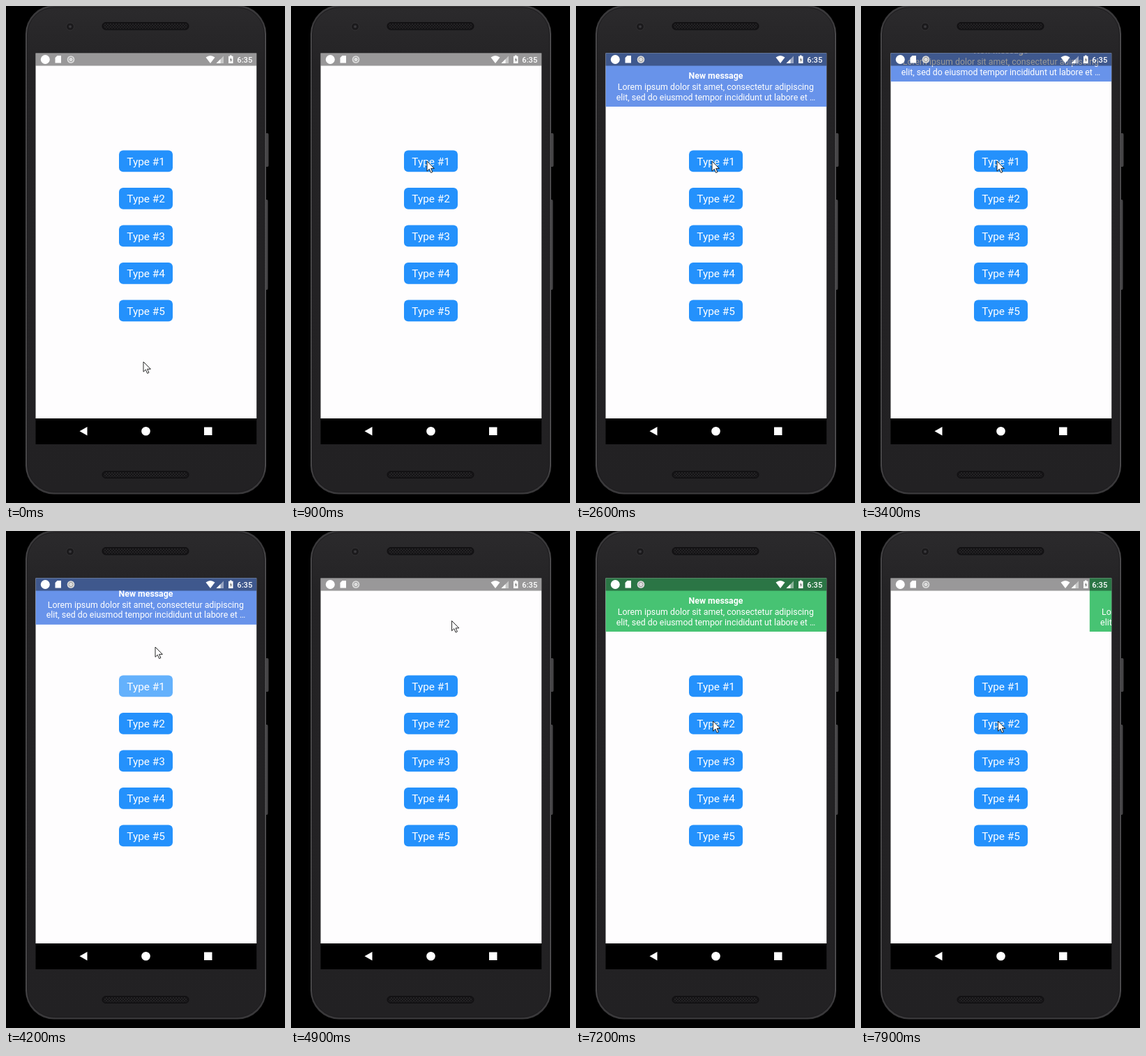
Write an HTML page that moves like this. It is 400 px wide and 711 px high and loops after 8000 ms.

```html
<!DOCTYPE html>
<html lang="en">
<head>
<meta charset="utf-8">
<title>Message banner demo</title>
<style>
  html, body { margin: 0; width: 100%; height: 100%; overflow: hidden; background: #000; }
  svg { display: block; width: 100%; height: 100%; }
  text { font-family: Roboto, sans-serif; fill: #fff; }
  .mid { text-anchor: middle; }
</style>
</head>
<body>
<svg viewBox="0 0 400 711">
  <defs>
    <clipPath id="screen"><rect x="42.5" y="67.5" width="316.7" height="522.5"/></clipPath>
    <linearGradient id="rim">
      <stop offset="0" stop-color="#4c4b4d"/><stop offset=".012" stop-color="#39383a"/>
      <stop offset=".988" stop-color="#39383a"/><stop offset="1" stop-color="#504f51"/>
    </linearGradient>
    <linearGradient id="front" x2="0" y2="1">
      <stop offset="0" stop-color="#2b2a2c"/><stop offset=".12" stop-color="#242325"/>
      <stop offset="1" stop-color="#222123"/>
    </linearGradient>
    <pattern id="mesh" width="4" height="4" patternUnits="userSpaceOnUse">
      <path d="M0 4L4 0M0 0L4 4" stroke="#2b2a2c" stroke-width=".7"/>
    </pattern>
  </defs>

  <!-- phone -->
  <path d="M373 182h2q1.500 0 1.500 2v44q0 2-1.500 2h-2zM373 277h1q1.500 0 1.500 2v125q0 2-1.500 2h-1z" fill="#454446"/>
  <rect x="28" y="-1" width="345" height="699.500" rx="41" fill="url(#rim)"/>
  <rect x="30.500" y="2" width="340" height="693.500" rx="39" fill="url(#front)" stroke="#171618" stroke-width=".8"/>
  <circle cx="92" cy="29.500" r="5.500" fill="#1b1a1c" stroke="#343335"/>
  <circle cx="92" cy="29.500" r="2" fill="#39383c"/>
  <g fill="#141315" stroke="#111012">
    <rect x="138" y="23.500" width="124" height="10.500" rx="5"/>
    <rect x="138" y="665.500" width="124" height="10" rx="5"/>
  </g>
  <g fill="url(#mesh)">
    <rect x="140" y="25" width="120" height="7.500" rx="3.700"/>
    <rect x="140" y="667" width="120" height="7" rx="3.500"/>
  </g>

  <!-- screen -->
  <g clip-path="url(#screen)">
    <rect x="42" y="67" width="318" height="523" fill="#fefdfe"/>
    <g id="buttons" font-size="15.400"></g>
    <g id="banner">
      <rect id="fill" x="42.500" y="67" width="317" height="77"/>
      <g class="mid" font-size="12.350">
        <text x="200.500" y="103.700" font-weight="700">New message</text>
        <text x="200.300" y="120.200">Lorem ipsum dolor sit amet, consectetur adipiscing</text>
        <text x="200.500" y="134.600">elit, sed do eiusmod tempor incididunt ut labore et …</text>
      </g>
    </g>
    <rect x="42" y="67" width="318" height="18.500" opacity=".4"/>
    <g fill="#fff">
      <circle cx="56.300" cy="76.500" r="6.500"/>
      <path d="M73.500 71h5.500v10.500h-8.500v-7.500z"/>
      <circle cx="93" cy="76.500" r="5.300" fill="#ddd"/>
      <circle cx="93" cy="76.500" r="3.200" fill="none" stroke="#999" stroke-width="1"/>
      <path d="M286.500 73.500Q293 68.500 299.500 73.500L293 82z"/>
      <path d="M312 71.500V82H301.500z" opacity=".45"/>
      <path d="M307.500 76V82H301.500z"/>
      <path d="M321 70.500h2.500v1.300h2v10.200h-6.500v-10.200h2z"/>
      <path d="M322.800 73.500l-2 4h1.400v3l2-4h-1.400z" fill="#777"/>
    </g>
    <text x="331.300" y="80.900" font-size="11.200" font-weight="500">6:35</text>
  </g>
  <rect x="42.500" y="590" width="316.700" height="37"/>
  <g fill="#fff">
    <path d="M116.500 602v12.500L105.500 608.200z"/>
    <circle cx="200.500" cy="608.300" r="6.300"/>
    <rect x="284" y="602.500" width="11.500" height="11.500"/>
  </g>

  <path id="cursor" d="M0 0V14.300L3.300 11.200L5.600 16.500L7.900 15.500L5.600 10.400H10.300Z"
        fill="#fff" stroke="#111" stroke-width=".9" stroke-linejoin="round"/>
</svg>
<script>
  const LOOP = 8000, TICK = 100;
  const $ = id => document.getElementById(id);
  const clamp = u => Math.min(1, Math.max(0, u));
  const span = (t, start, length) => clamp((t - start) / length);

  $('buttons').innerHTML = [0, 1, 2, 3, 4].map(i => `<g>
    <rect x="162" y="${206.4 + 53.5 * i}" width="77" height="30.800" rx="6" fill="#2491fc"/>
    <text class="mid" x="200.600" y="${227.6 + 53.5 * i}">Type #${i + 1}</text></g>`).join('');
  const buttons = [...$('buttons').children];

  // Each tap shows a banner that slides in from the top or from the right.
  const shows = [
    { button: 0, start: 1287, hide: 3302, color: '#6893ea', dx: 0, dy: -77 },
    { button: 0, start: 4028, hide: 4605, color: '#6893ea', dx: 0, dy: -77 },
    { button: 1, start: 5624, hide: 7711, color: '#47c373', dx: 317, dy: 0 }
  ];

  // Pointer moves: start, end, then a quadratic curve.
  const moves = [
    [100, 900, [197, 509], [245, 370], [195, 222]],
    [4000, 4400, [195, 222], [215.5, 163], [230, 116]],
    [4770, 5500, [230, 116], [235, 190], [197, 275]],
    [6300, 6600, [197, 275], [197, 273], [196.5, 272]]
  ];

  function pointer(t) {
    const [start, end, a, b, c] = moves.findLast(m => t >= m[0]) || moves[0];
    const u = span(t, start, end - start), s = u * u * (3 - 2 * u);
    return a.map((v, i) => (1 - s) ** 2 * v + 2 * s * (1 - s) * b[i] + s * s * c[i]);
  }

  const hidden = (t, s) => (1 - span(t, s.start, 350)) ** 3 + span(t, s.hide, 210);
  const dip = (t, s) => 0.53 * Math.min(span(t, s.start - 85, 85), 1 - span(t, s.start, 390));

  function draw(t) {
    const show = shows.findLast(s => t >= s.start - 85) || shows[0];
    const away = hidden(t, show);
    $('fill').setAttribute('fill', show.color);
    $('banner').setAttribute('visibility', away < 1 ? 'visible' : 'hidden');
    $('banner').setAttribute('transform', `translate(${show.dx * away} ${show.dy * away})`);
    buttons.forEach((b, i) => b.setAttribute('opacity', i === show.button ? 1 - dip(t, show) : 1));
    $('cursor').setAttribute('transform', `translate(${pointer(t)})`);
  }

  const origin = performance.now();
  function frame() {
    const t = (performance.now() - origin) % LOOP;
    draw(Math.floor(t / TICK) * TICK);
    requestAnimationFrame(frame);
  }
  frame();
</script>
</body>
</html>
```
